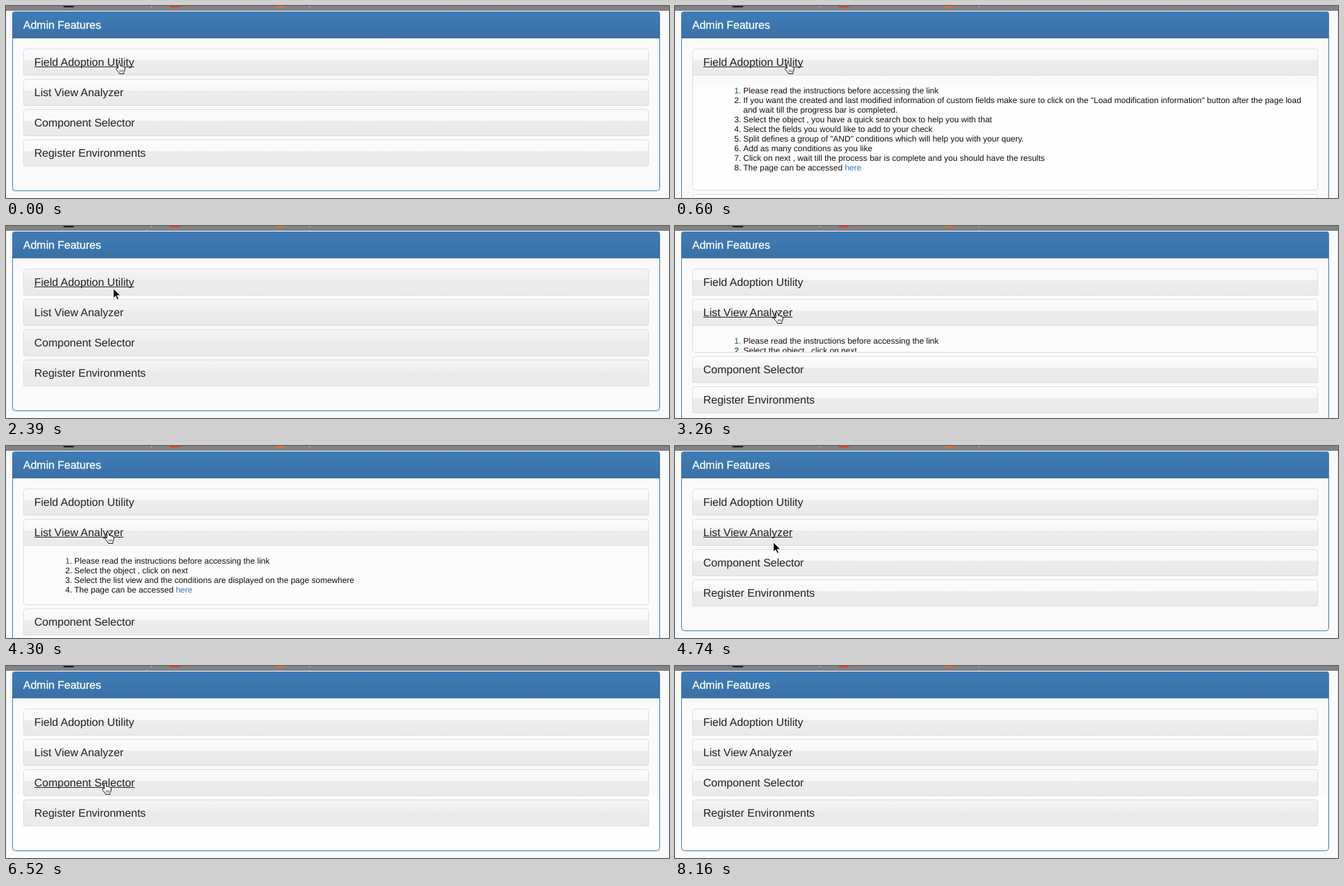
Write an HTML page that moves like this. It is 962 by 279 pixels and loops after 8.91 s.

```html
<!DOCTYPE html>
<html lang="en">
<head>
<meta charset="utf-8">
<title>Admin Features</title>
<style>
  html, body { margin: 0; width: 100%; height: 100%; overflow: hidden; background: #fafafa; }
  svg { display: block; }
  text { font-family: "Liberation Sans", Arial, Helvetica, sans-serif; white-space: pre; text-rendering: geometricPrecision; }
  .title { font-size: 16px; fill: #222; }
  .line { font-size: 12px; fill: #111; }
</style>
</head>
<body>
<svg id="stage" width="962" height="279" viewBox="0 0 962 279">
  <defs>
    <linearGradient id="blue" x2="0" y2="1">
      <stop stop-color="#3f7cb8"/><stop offset="1" stop-color="#3a71a5"/>
    </linearGradient>
    <linearGradient id="crisp" x2="0" y2="1">
      <stop stop-color="#fbfbfb"/><stop offset=".43" stop-color="#f8f8f8"/>
      <stop offset=".43" stop-color="#ececec"/><stop offset="1" stop-color="#eaeaea"/>
    </linearGradient>
    <linearGradient id="soft" x2="0" y2="1">
      <stop stop-color="#f4f4f4"/><stop offset=".43" stop-color="#f0f0f0"/>
      <stop offset=".43" stop-color="#ececec"/><stop offset="1" stop-color="#eaeaea"/>
    </linearGradient>
  </defs>
  <rect width="962" height="279" fill="#fafafa"/>
  <rect width="962" height="7" fill="#828282"/>
  <rect x="83" y="-4" width="16" height="6" rx="2" fill="#222"/>
  <rect x="237" y="-4" width="16" height="6" rx="2" fill="#e8392f"/>
  <rect x="391" y="-4" width="15" height="6" rx="3" fill="#f06a35"/>
  <path d="M211 0v1.5M441 0v1.5" stroke="#ddd"/>
  <rect id="lower" x="10" y="187" width="938" height="81" fill="#fefefe"/>
  <rect id="panel" x="9.5" y="8.5" width="939" rx="4" fill="none" stroke="#3d79b0"/>
  <path d="M9 47V12a4 4 0 0 1 4-4H945a4 4 0 0 1 4 4V47Z" fill="url(#blue)"/>
  <text class="title" x="25" y="33" style="fill:#fff;stroke:#fff;stroke-width:.3">Admin Features</text>
  <g id="sections"></g>
  <g id="cursor" stroke-linejoin="round">
    <g id="hand">
      <path d="M3.5 9.7V2.6C3.5.6 6 .6 6.2 2.3L7 6.5C8 5.8 9 6.2 9.3 7 10 6.3 11.2 6.7 11.4 7.6 12.4 7 13.7 7.6 13.6 9 13.6 12 13 14 12 15.5V17.5H5.5C5 15.5 3 13.5 1 11 0 9.3 2 8.3 3.5 9.7Z" fill="#fff" stroke="#111"/>
      <path d="M6.5 11.5v3.5M8.6 11.5v3.5M10.7 11.5v3.5" stroke="#333" stroke-width=".8"/>
    </g>
    <path id="arrow" d="M.7.8V15L4 11.9 6.2 17.2 8.6 16.2 6.4 11.1H11.2Z" fill="#111" stroke="#fff"/>
  </g>
</svg>
<script>
const LOOP = 8910, SLIDE = 350, HEADING = 39, LINE = 14;
const NS = "http://www.w3.org/2000/svg";
const $ = id => document.getElementById(id);

const first = "Please read the instructions before accessing the link";
const last = "The page can be accessed ";
const sections = [
  { title: "Field Adoption Utility", open: 140, close: 1788, hover: [0, 2530], white: 16, items: [
    first,
    "If you want the created and last modified information of custom fields make sure to click on the \"Load modification information\" button after the page load\nand wait till the progress bar is completed.",
    "Select the object , you have a quick search box to help you with that",
    "Select the fields you would like to add to your check",
    "Split defines a group of \"AND\" conditions which will help you with your query.",
    "Add as many conditions as you like",
    "Click on next , wait till the process bar is complete and you should have the results",
    last] },
  { title: "List View Analyzer", open: 3174, close: 4250, hover: [3120, 5340], items: [
    first,
    "Select the object , click on next",
    "Select the list view and the conditions are displayed on the page somewhere",
    last] },
  { title: "Component Selector", open: 5335, close: 6085, hover: [5340, 8160], items: [
    first,
    "Select single or multiple metadata types , click on next",
    "enter the criteria seperated by commas and export the list into a csv/pdf",
    last] },
  { title: "Register Environments", items: [] }
];

// The screen refreshes in bursts: start, end, number of steps.
const bursts = [[150, 600, 4], [1650, 2680, 8], [2820, 2820, 1], [3120, 3560, 4], [4150, 5040, 7],
  [5340, 5640, 3], [6090, 6520, 4], [6820, 7120, 3], [7410, 7560, 2], [8160, 8160, 1]];
const beats = [0];
for (const [from, to, n] of bursts)
  for (let k = 0; k < n; k++)
    beats.push(n > 1 ? Math.floor((from + (to - from) * k / (n - 1)) / 10) * 10 : from);

// Pointer stops: time, x, y.
const stops = [[0, 159, 81], [2230, 159, 81], [2680, 147, 108], [2820, 143, 124], [4590, 143, 124],
  [5040, 139, 169], [6670, 139, 169], [6970, 430, 211], [7120, 667, 181], [7410, 908, 258]];

function add(parent, tag, attrs, text) {
  const el = document.createElementNS(NS, tag);
  for (const key in attrs) el.setAttribute(key, attrs[key]);
  if (text) el.textContent = text;
  return parent.appendChild(el);
}

function show(el, on) { el.style.display = on ? "" : "none"; }

function bezier(s, a, b) { return 3 * s * (1 - s) ** 2 * a + 3 * s * s * (1 - s) * b + s ** 3; }

// CSS "ease"
function ease(u) {
  if (u <= 0) return 0;
  if (u >= 1) return 1;
  let lo = 0, hi = 1;
  for (let i = 0; i < 24; i++) {
    const mid = (lo + hi) / 2;
    if (bezier(mid, .25, .25) < u) lo = mid; else hi = mid;
  }
  return bezier(lo, .1, 1);
}

function build(section) {
  const g = section.group = add($("sections"), "g", {});
  section.head = add(g, "path", { d: `M25 ${HEADING}V4a4 4 0 0 1 4-4H929a4 4 0 0 1 4 4V${HEADING}Z` });
  section.body = add(g, "svg", { y: HEADING, width: 962, overflow: "hidden" });
  const top = section.white || 0;
  add(section.body, "rect", { x: 26, y: top, width: 906, height: 200, fill: top ? "#fefefe" : "#fcfcfc" });
  let y = 26;
  section.items.forEach((item, i) => {
    add(section.body, "text", { class: "line", x: 86, y, style: i ? "" : "fill:#235b80" }, `${i + 1}.`);
    for (const part of item.split("\n")) {
      const row = add(section.body, "text", { class: "line", x: 99, y }, part);
      if (item === last) add(row, "tspan", { fill: "#337ab7" }, "here");
      y += LINE;
    }
  });
  section.full = y + 15;
  section.rule = add(g, "path", { d: `M26 ${HEADING - .5}H932`, stroke: "#ddd" });
  section.frame = add(g, "rect", { x: 25.5, y: .5, width: 907, rx: 4, fill: "none", stroke: "#ddd" });
  const title = add(g, "text", { class: "title", x: 41, y: 25 }, section.title);
  section.underline = add(g, "rect", { x: 41, y: 26, width: title.getComputedTextLength(), height: 1, fill: "#222" });
}

function bodyHeight({ open, close, full }, t) {
  if (open === undefined) return 0;
  return Math.round(full * (ease((t - open) / SLIDE) - ease((t - close) / SLIDE)));
}

function pointer(t) {
  const i = stops.findIndex(stop => stop[0] > t);
  if (i < 0) return stops[stops.length - 1].slice(1);
  const [t0, x0, y0] = stops[i - 1], [t1, x1, y1] = stops[i];
  const u = (t - t0) / (t1 - t0);
  return [x0 + (x1 - x0) * u, y0 + (y1 - y0) * u];
}

function draw(time) {
  const t = beats.filter(beat => beat <= time).pop();
  let y = 62;
  sections.forEach((section, i) => {
    const h = bodyHeight(section, t);
    const soft = t >= 1790 && t < 3120 || i === 3 && t >= 6090;
    section.group.setAttribute("transform", `translate(0 ${y})`);
    section.head.setAttribute("fill", `url(#${soft ? "soft" : "crisp"})`);
    section.body.setAttribute("height", h);
    section.frame.setAttribute("height", HEADING - 1 + h);
    show(section.body, h > 0);
    show(section.rule, h > 0);
    show(section.underline, section.hover && t >= section.hover[0] && t < section.hover[1]);
    y += HEADING + h + 5;
  });
  $("panel").setAttribute("height", y + 22);
  show($("lower"), t >= 6380);

  const [px, py] = pointer(t);
  const arrow = t >= 2380 && t < 2820 || t > 4600 && t < 5040 || t >= 6820;
  $("cursor").setAttribute("transform", `translate(${Math.round(px)} ${Math.round(py)})`);
  show($("cursor"), t < 7560);
  show($("arrow"), arrow);
  show($("hand"), !arrow);
}

sections.forEach(build);
const start = performance.now();
function tick() {
  draw((performance.now() - start) % LOOP);
  requestAnimationFrame(tick);
}
tick();
</script>
</body>
</html>
```
